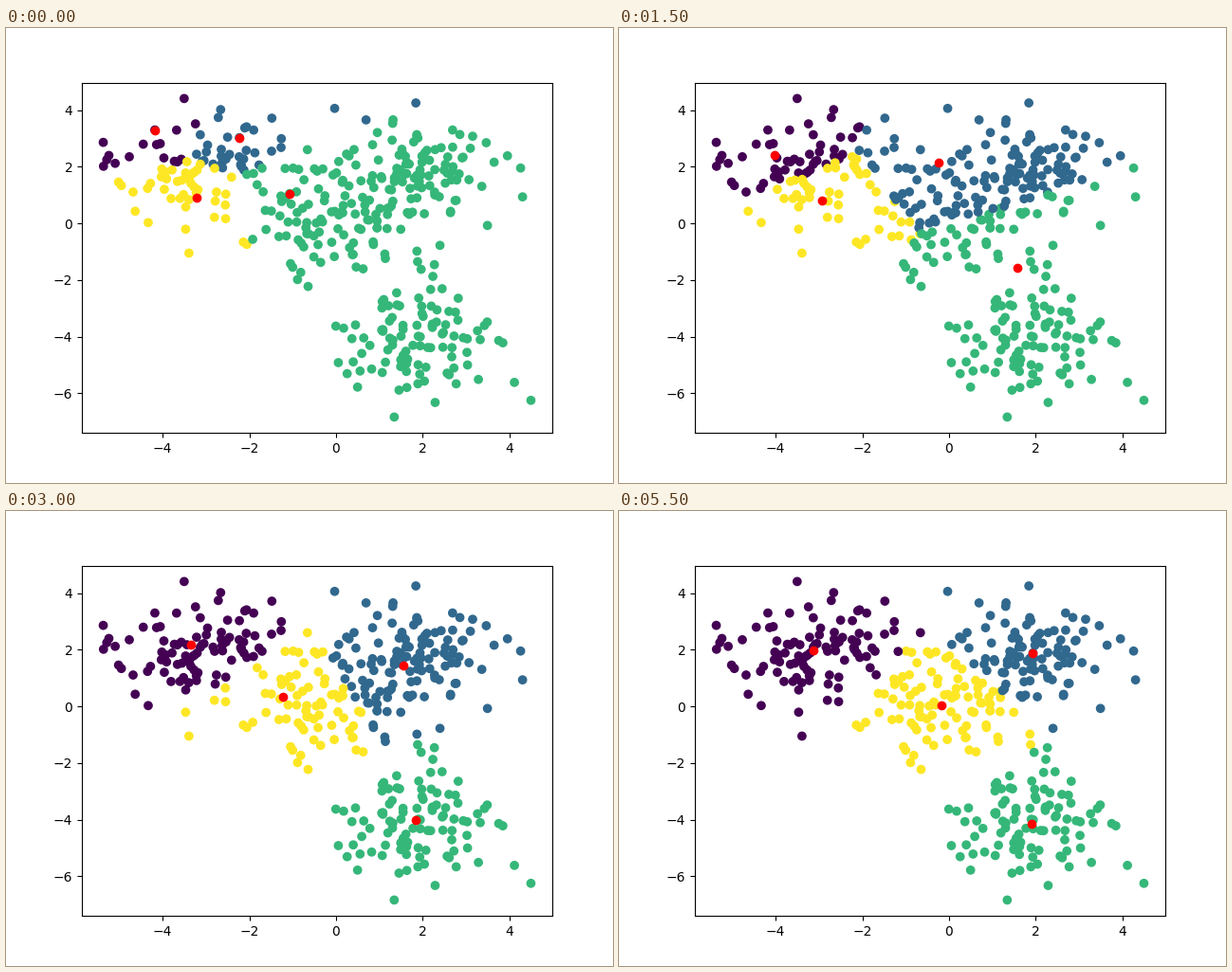
A matplotlib script for the animation above (6 s loop, 640 by 480 pixels).

```python
import matplotlib.pyplot as plt
import numpy as np
from matplotlib.animation import FuncAnimation

STEPS = 12
PER_BLOB = 100
BLOB_CENTERS = [(0, 0), (2, 2), (-3, 2), (2, -4)]
# Starting centroids are the data points closest to these spots.
START_SPOTS = np.array([(-4.17, 3.28), (-2.22, 3.015), (-1.066, 1.03), (-3.21, 0.894)])


def make_points():
    rng = np.random.RandomState(0)
    points = np.vstack([rng.normal(c, 1.0, (PER_BLOB, 2)) for c in BLOB_CENTERS])
    order = np.arange(len(points))
    rng.shuffle(order)
    return points[order]


def nearest(points, targets):
    """Index of the closest target for each point."""
    gaps = points[:, None, :] - targets[None, :, :]
    return (gaps ** 2).sum(axis=2).argmin(axis=1)


def lloyd(points, centers, steps):
    """History of (centers, labels), one entry per iteration."""
    history = []
    for _ in range(steps):
        labels = nearest(points, centers)
        history.append((centers, labels))
        centers = np.array([points[labels == k].mean(axis=0) for k in range(len(centers))])
    return history


points = make_points()
history = lloyd(points, points[nearest(START_SPOTS, points)], STEPS)

fig, ax = plt.subplots(figsize=(6.4, 4.8), dpi=100)
dots = ax.scatter(points[:, 0], points[:, 1], c=history[0][1], cmap="viridis", vmin=0, vmax=3)
marks = ax.scatter(history[0][0][:, 0], history[0][0][:, 1], c="r")


def draw(frame):
    centers, labels = history[frame]
    dots.set_array(labels)
    marks.set_offsets(centers)
    return dots, marks


anim = FuncAnimation(fig, draw, frames=STEPS, interval=500, repeat=True, repeat_delay=0)
plt.show()
```
